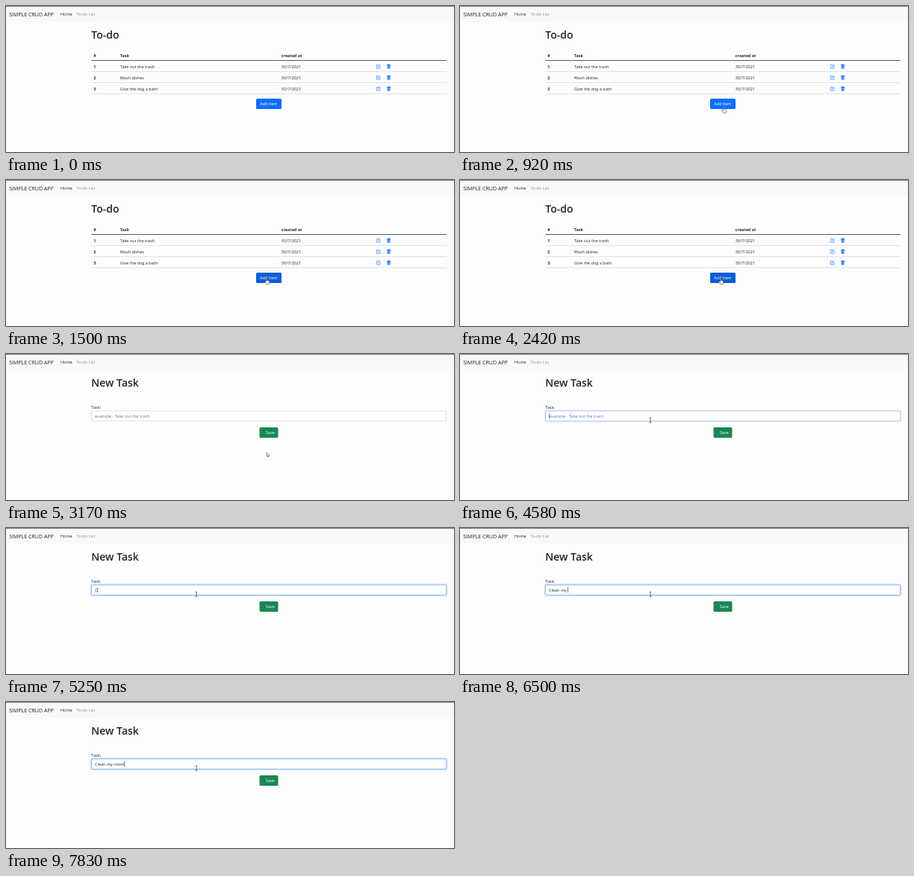
An HTML page that plays this animation: 600x197 px, repeating every 8000 ms.

```html
<!DOCTYPE html>
<html lang="en">
<head>
<meta charset="utf-8">
<title>To-do</title>
<style>
html, body { margin: 0; width: 100%; height: 100%; overflow: hidden; background: #fefdfe; }
svg { display: block; width: 600px; height: 197px; }
text { font: 5.55px "Open Sans", "Noto Sans", sans-serif; fill: #212529; }
.brand { font-size: 7.05px; }
.h1 { font-size: 14px; font-weight: 600; }
.b { font-weight: 700; font-size: 5.4px; }
.muted { fill: #8b8c8d; }
.hint { fill: #6c757d; }
.btn { fill: #fff; }
</style>
</head>
<body>
<svg viewBox="0 0 600 197">
  <defs>
    <g id="edit" fill="none" stroke="#0d6efd" stroke-width=".65">
      <path d="M3.4 .7H1Q.4 .7 .4 1.3V5Q.4 5.5 1 5.5H4.8Q5.3 5.5 5.3 5V2.8"/>
      <path d="M2.2 3.7L5.3 .5" stroke-width="1"/>
    </g>
    <g id="trash" fill="#0d6efd">
      <path d="M.3 .5H1.8L2.1 .1H3.5L3.8 .5H5.3V1.4H.3ZM.7 1.7H4.9L4.6 5.4Q4.5 5.9 4 5.9H1.6Q1.1 5.9 1 5.4Z"/>
      <path d="M1.9 2.3V5.1M2.8 2.3V5.1M3.7 2.3V5.1" stroke="#fff" stroke-width=".3"/>
    </g>
  </defs>

  <rect width="600" height="21" fill="#f8f9fa"/>
  <rect width="600" height="1" fill="#77787a"/>
  <text class="brand" x="4.2" y="13.5">SIMPLE CRUD APP</text>
  <text x="73" y="13">Home</text>
  <text class="muted" x="94.5" y="13">To-do List</text>

  <g id="list">
    <text class="h1" x="114.3" y="44">To-do</text>
    <text class="b" x="117.2" y="68.5">#</text>
    <text class="b" x="152.8" y="68.5">Task</text>
    <text class="b" x="368.8" y="68.5">created at</text>
    <rect x="114.5" y="73" width="475.5" height="1" fill="#55585b"/>
    <g id="rows"></g>
    <rect id="add" x="335" y="125" width="34" height="14" rx="1.5"/>
    <text class="btn" x="340" y="133.9">Add Item</text>
  </g>

  <g id="form">
    <text class="h1" x="114.3" y="44">New Task</text>
    <text x="114.3" y="74.4">Task:</text>
    <rect x="114.4" y="76.9" width="475.3" height="13.5" rx="1.5" fill="#fff" stroke="#ced4da" stroke-width=".7"/>
    <g id="ring" fill="none">
      <rect x="113.6" y="76.1" width="476.9" height="15.1" rx="2.2" stroke="#c2dbfe" stroke-width="1.5"/>
      <rect x="114.4" y="76.9" width="475.3" height="13.5" rx="1.5" stroke="#86b7fe" stroke-width=".7"/>
    </g>
    <text id="hint" class="hint" x="119" y="85.7">example - Take out the trash</text>
    <text id="typed" x="119" y="85.7" xml:space="preserve"></text>
    <rect id="caret" y="80" width=".6" height="7.2" fill="#212529"/>
    <rect x="339.5" y="99" width="25" height="14" rx="1.5" fill="#198754"/>
    <text class="btn" x="347.8" y="108.2">Save</text>
  </g>

  <g id="cursor" stroke-linejoin="round">
    <path id="arrow" d="M0 0V6L1.4 4.8L2.3 6.8L3.2 6.4L2.3 4.4H4.1Z" fill="#fff" stroke="#222" stroke-width=".5"/>
    <path id="hand" d="M-.6 .4Q0-.4 .6 .4V3L3 3.5Q3.8 3.7 3.7 4.7L3.2 7V8.2H-.7V7.2L-2.6 4.9Q-2.7 3.9-1.7 4.2L-.6 5.1Z" fill="#fff" stroke="#222" stroke-width=".5"/>
    <path id="beam" d="M-1.2-3.2H1.2M0-3.2V3.2M-1.2 3.2H1.2" fill="none" stroke="#333" stroke-width=".7"/>
  </g>
</svg>
<script>
const LOOP = 8000, PAGE = 3080, FOCUS = 4500;
const $ = id => document.getElementById(id);
const show = (id, on) => $(id).setAttribute("visibility", on ? "visible" : "hidden");
const ramp = (t, from, span) => Math.min(1, Math.max(0, (t - from) / span));

$("rows").innerHTML = ["Take out the trash", "Wash dishes", "Give the dog a bath"].map((task, i) =>
  `<g transform="translate(0 ${i * 15})">
    <text class="b" x="117.2" y="83.5">${i + 1}</text>
    <text x="152.8" y="83.5">${task}</text>
    <text x="368.8" y="83.5">30/7/2021</text>
    <use href="#edit" x="495.8" y="78.6"/>
    <use href="#trash" x="509.8" y="78.5"/>
    <rect x="114.5" y="88" width="475.5" height="1" fill="#dee2e6"/>
  </g>`).join("");

// Pointer stops: time, x, y
const stops = [[500, 302, 183], [920, 353, 136], [1250, 349, 132.5], [3900, 349, 132.5],
               [4000, 304.5, 135.5], [4450, 255, 89.5]];
const message = "Clean my room";
const keyTimes = [5170, 5420, 5580, 5750, 5920, 6000, 6250, 6420, 6500, 7330, 7500, 7670, 7830];

function pointer(t) {
  const next = stops.findIndex(s => s[0] > t);
  if (next < 1) return stops[next ? stops.length - 1 : 0].slice(1);
  const [t0, x0, y0] = stops[next - 1], [t1, x1, y1] = stops[next];
  const p = (t - t0) / (t1 - t0), k = p * (2 - p);
  return [x0 + (x1 - x0) * k, y0 + (y1 - y0) * k];
}

function draw(t) {
  const onForm = t >= PAGE;
  show("list", !onForm);
  $("form").style.display = onForm ? "" : "none";

  const hover = ramp(t, 1000, 150);
  $("add").setAttribute("fill", `rgb(${13 - 2 * hover},${110 - 16 * hover},${253 - 38 * hover})`);

  const count = keyTimes.filter(k => k <= t).length;
  $("typed").textContent = message.slice(0, count);
  show("hint", !count);
  $("ring").setAttribute("opacity", ramp(t, FOCUS, 150));

  const lastKey = count ? keyTimes[count - 1] : FOCUS;
  show("caret", t >= FOCUS && (t - lastKey) % 1000 < 500);
  if (onForm) $("caret").setAttribute("x", 119 + (count ? $("typed").getComputedTextLength() : 0));

  const [x, y] = pointer(t);
  const shape = onForm ? (y < 91 ? "beam" : "arrow") : (y < 139 ? "hand" : "arrow");
  for (const id of ["arrow", "hand", "beam"]) show(id, t >= 500 && id === shape);
  $("cursor").setAttribute("transform", `translate(${x} ${y})`);
}

function tick() {
  draw(performance.now() % LOOP);
  requestAnimationFrame(tick);
}
tick();
</script>
</body>
</html>
```
